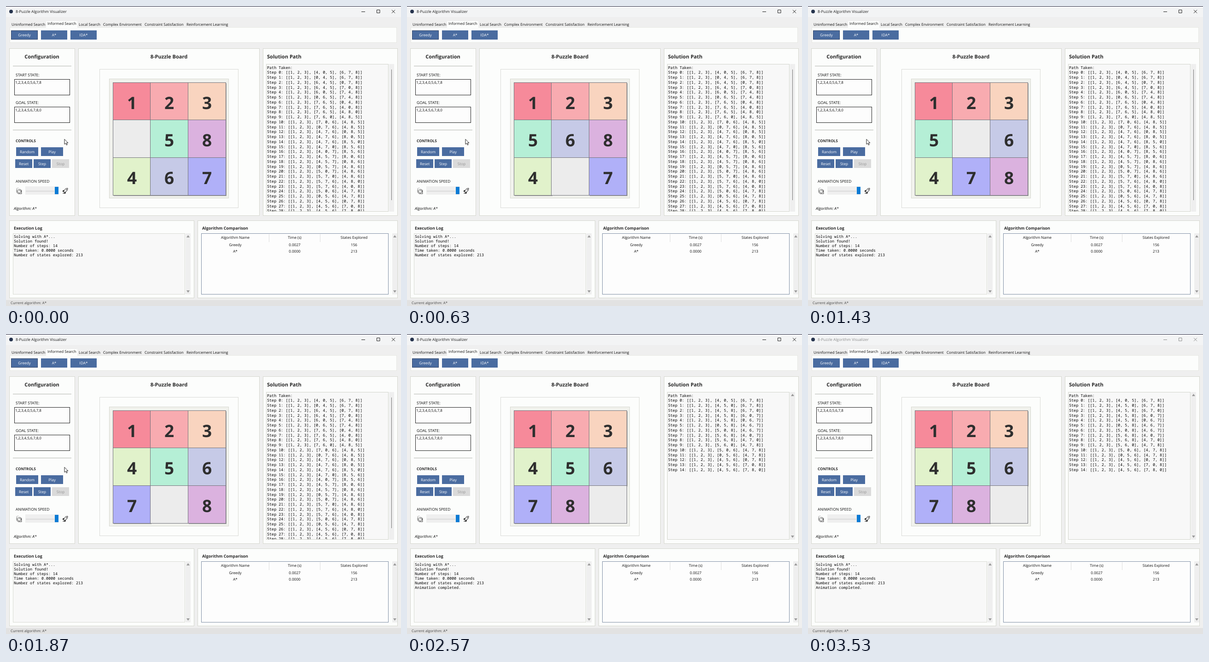
An HTML page with a canvas that plays this animation: 858 px wide and 652 px high, repeating every 3560 ms.

```html
<!DOCTYPE html>
<html lang="en">
<head>
<meta charset="utf-8">
<title>8-Puzzle</title>
<style>
html, body { margin: 0; width: 100%; height: 100%; overflow: hidden; background: #efefef; }
canvas { display: block; }
</style>
</head>
<body>
<canvas id="stage" width="858" height="652"></canvas>
<script>
const ctx = document.getElementById('stage').getContext('2d');
const LOOP = 3560, FIRST_MOVE = 390, MOVE_TIME = 210, DONE = 2280, CURSOR_GONE = 2400, BLUR = 3230;
const UI = '"Open Sans", sans-serif', MONO = '"Noto Sans Mono", monospace';
const TILES = ['#ececec', '#f68a9a', '#f8abb0', '#f9d4bf', '#e1f2cb', '#b5efd6', '#c6cae7', '#b0b0f8', '#dbb2df'];
const BLUE = '#4a6ca0', PANEL = '#fcfdfc', EDGE = '#d5d7cf', PAPER = '#f8f8f8';

// Follow the blank through a string of moves and keep every state.
function solve(moves) {
  const shift = { L: -1, R: 1, U: -3, D: 3 };
  const states = [[1, 2, 3, 4, 0, 5, 6, 7, 8]];
  for (const m of moves) {
    const s = states[states.length - 1].slice();
    const from = s.indexOf(0), to = from + shift[m];
    s[from] = s[to];
    s[to] = 0;
    states.push(s);
  }
  return states;
}
const greedy = solve('LDRULDRRULLDRRULDLURRDLULDRR');
const astar = solve('RDLLURDRULLDRR');

function rect(x, y, w, h, fill, stroke) {
  if (fill) { ctx.fillStyle = fill; ctx.fillRect(x, y, w, h); }
  if (stroke) {
    ctx.strokeStyle = stroke;
    ctx.lineWidth = 1;
    ctx.strokeRect(x + .5, y + .5, w - 1, h - 1);
  }
}
function text(str, x, y, size = 8, { color = '#0c0c0c', align = 'left', style = '', family = UI } = {}) {
  ctx.font = `${style} ${size}px ${family}`;
  ctx.fillStyle = color;
  ctx.textAlign = align;
  ctx.fillText(str, x, y);
}
function shape(d, fill, stroke, width = 1) {
  const p = new Path2D(d);
  ctx.lineWidth = width;
  if (fill) { ctx.fillStyle = fill; ctx.fill(p); }
  if (stroke) { ctx.strokeStyle = stroke; ctx.stroke(p); }
}
const bold = (s, x, y, size, align) => text(s, x, y, size, { style: 'bold', align, color: '#262626' });
const mono = (s, x, y, size = 8.33) => text(s, x, y, size, { family: MONO, style: '500', color: '#000' });
const center = (s, x, y) => text(s, x, y, 8.1, { align: 'center' });

function button(label, x, y, w, h, off) {
  rect(x, y, w, h, off ? '#dadada' : BLUE);
  text(label, x + w / 2, y + h / 2 + 3, 8.2, { align: 'center', color: off ? '#949494' : '#fff' });
}
function scrollbar(x, y, h, thumb) {
  rect(x, y, 11, h, '#efefef');
  if (thumb) return rect(x + 5, y + 12, 1, 284, '#777');
  const c = x + 5.5;
  shape(`M${c - 3.5} ${y + 9}h7l-3.5 -5zM${c - 3.5} ${y + h - 9}h7l-3.5 5z`, '#9a9a9a');
}

function header(focused) {
  const ink = focused ? '#1a1a1a' : '#8c8c8c';
  rect(0, 0, 858, 24, '#f3f4f5');
  rect(0, 0, 858, 1, '#20203a');
  ctx.beginPath();
  ctx.arc(11, 12, 4, 0, 7);
  ctx.fillStyle = '#26344e';
  ctx.fill();
  text('8-Puzzle Algorithm Visualizer', 21, 15, 8.28, { color: ink });
  shape('M772 12.5h8M805.5 8.5h6.5v6.5h-6.5zM838 8.5l7 7M845 8.5l-7 7', null, ink);

  rect(8, 46, 841, 34, PANEL, '#e6e7e3');
  rect(87, 33, 68, 14, PANEL);
  [['Uninformed Search', 12], ['Informed Search', 90], ['Local Search', 158], ['Complex Environment', 211],
   ['Constraint Satisfaction', 301], ['Reinforcement Learning', 392]]
    .forEach(([s, x], i) => text(s, x, i == 1 ? 41 : 43, 8.08));
  button('Greedy', 11, 53, 58, 20);
  button('A*', 76, 53, 57, 20);
  button('IDA*', 140, 53, 57, 20);
  if (focused) rect(11, 53, 58, 20, null, '#2d4268');
}

function config() {
  bold('Configuration', 78, 114, 11, 'center');
  rect(15, 130, 127, 1, '#b2b4ae');
  rect(15, 269, 127, 1, '#b2b4ae');
  text('START STATE:', 21, 153, 8.5);
  rect(18, 159, 121, 35, '#fdfdfd', '#222');
  text('1,2,3,4,0,5,6,7,8', 20, 169, 8);
  text('GOAL STATE:', 21, 213, 8.5);
  rect(18, 219, 121, 35, '#fdfdfd', '#222');
  text('1,2,3,4,5,6,7,8,0', 20, 229, 8);
  bold('CONTROLS', 21, 296, 8.15);
  button('Random', 22, 307, 48, 19);
  button('Play', 76, 307, 48, 19);
  button('Reset', 20, 333, 37, 19);
  button('Step', 60, 333, 37, 19);
  button('Stop', 100, 333, 37, 19, true);
  text('ANIMATION SPEED', 21, 384, 8.4);
  rect(42, 392, 72, 18, '#efefef');
  rect(43, 401, 62, 3, '#e0e0e0');
  rect(106, 393, 8, 16, '#0a7bd4');
  // Snail and rocket
  shape('M24 397l-1 -1M26 396v-1M24 398c-2 3 -1 9 3 10h7M34 403a4.5 4.5 0 1 0 -9 0a4 4 0 0 0 7 2a2.5 2.5 0 1 0 -4 -3M33 400l1 8', null, '#333', .9);
  shape('M134 396c-5 0 -8 4 -9 7l2 2c4 -1 7 -4 7 -9z', '#eee', '#222', 1);
  shape('M127 400l-4 1v3l3 -1zM130 404l-1 4h-3l1 -3zM125 405l-2 3l3 -1z', '#222');
  shape('M131 398.5h1v1h-1z', '#222', '#222', .8);
  text('Algorithm: A*', 17, 443, 8.4, { style: 'italic' });
}

function board(state) {
  const cell = 245 / 3, left = 232, top = 166;
  bold('8-Puzzle Board', 354, 114, 11.1, 'center');
  rect(203, 137, 302, 302, PANEL, '#d9dad6');
  rect(224, 158, 260, 260, '#f1f2ed', '#d6d8d0');
  const each = fn => state.forEach((n, i) =>
    fn(n, Math.floor(left + i % 3 * cell), Math.floor(top + Math.floor(i / 3) * cell)));
  each((n, x, y) => { if (n) rect(x + 2, y + 2, 82, 82, '#a5a5a5'); });
  each((n, x, y) => {
    rect(x, y, 83, 83, TILES[n], '#74747c');
    if (n) text(n, x + 41.5, y + 57.5, 37, { style: 'bold', align: 'center', color: '#2e2e2e' });
  });
}

function solution(done) {
  bold('Solution Path', 567, 114, 11.1);
  rect(565, 126, 266, 321, PAPER, '#d2d4cc');
  ctx.save();
  ctx.beginPath();
  ctx.rect(566, 127, 264, 319);
  ctx.clip();
  mono('Path Taken:', 567, 136.5, 8.43);
  (done ? astar : greedy).forEach((s, i) => {
    const rows = [0, 3, 6].map(r => `[${s.slice(r, r + 3).join(', ')}]`).join(', ');
    mono(`Step ${i}: [${rows}]`, 567, 147.4 + i * 10.75, 8.43);
  });
  ctx.restore();
  scrollbar(832, 126, 321, !done);
}

function log(done) {
  bold('Execution Log', 17, 486, 8.95);
  rect(15, 494, 374, 133, PAPER, '#d9dbd4');
  const lines = ['Solving with A*...', 'Solution found!', 'Number of steps: 14',
    'Time taken: 0.0000 seconds', 'Number of states explored: 213'];
  if (done) lines.push('Animation completed.');
  lines.forEach((s, i) => mono(s, 17, 504 + i * 10));
  scrollbar(390, 494, 133);
}

function comparison() {
  bold('Algorithm Comparison', 426, 486, 8.87);
  rect(424, 494, 407, 133, '#fdfdfd', '#8190a6');
  for (const x of [571, 682]) rect(x, 496, 1, 17, '#dedede');
  [['Algorithm Name', 'Time (s)', 'States Explored'], ['Greedy', '0.0027', '156'], ['A*', '0.0000', '213']]
    .forEach((row, r) => row.forEach((s, c) => center(s, [498, 627, 756][c], [506, 522, 536][r])));
  scrollbar(839, 494, 133);
}

function draw(t) {
  const done = t >= DONE;
  const step = t < FIRST_MOVE ? 5 : Math.min(14, 6 + Math.floor((t - FIRST_MOVE) / MOVE_TIME));
  rect(0, 0, 858, 652, '#efefef');
  header(t < BLUR);
  for (const [x, y, w, h] of [[7, 92, 143, 364], [157, 92, 394, 364], [558, 92, 293, 364],
    [7, 466, 402, 169], [416, 466, 435, 169]]) rect(x, y, w, h, PANEL, EDGE);
  config();
  board(astar[step]);
  solution(done);
  log(done);
  comparison();
  rect(0, 639, 858, 13, '#e2e2e2');
  text('Current algorithm: A*', 10, 648, 7.75, { color: '#444' });
  if (t < CURSOR_GONE) shape('M127 289.5v11l2.6 -2.3l1.8 4l1.8 -.8l-1.8 -3.9h3.4z', '#fff', '#222');
}

ctx.textRendering = 'geometricPrecision';
(function tick() {
  draw(performance.now() % LOOP);
  requestAnimationFrame(tick);
})();
</script>
</body>
</html>
```
